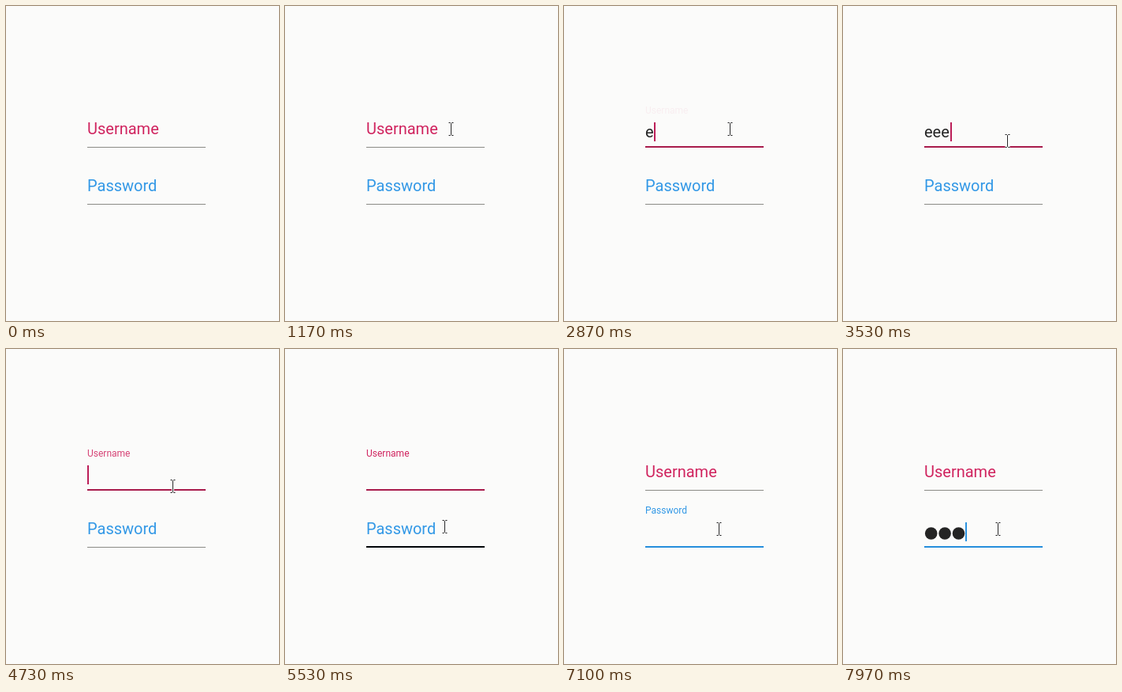
Animation, 346 px wide and 398 px high, one loop 8 s. Source, as an HTML page:

```html
<!DOCTYPE html>
<html lang="en">
<head>
<meta charset="utf-8">
<title>Login fields</title>
<style>
  html, body { margin: 0; width: 100%; height: 100%; overflow: hidden; background: #fbfbfa; }
  svg { display: block; width: 100%; height: 100%; }
  text { font-family: Roboto, Arial, sans-serif; }
</style>
</head>
<body>
<svg id="stage" viewBox="0 0 346 398"></svg>
<script>
const LOOP = 8000, BLINK = 500, LEFT = 103, FIELD_END = 257;
const DARK = '#242424', REST = '#8b8b86';
const stage = document.getElementById('stage');

function set(el, attrs) {
  for (const name in attrs) el.setAttribute(name, attrs[name]);
}
function add(tag, attrs, text = '') {
  const el = document.createElementNS('http://www.w3.org/2000/svg', tag);
  set(el, attrs);
  el.textContent = text;
  stage.append(el);
  return el;
}
const clamp = x => Math.min(1, Math.max(0, x));
const mix = (a, b, k) => a + (b - a) * k;
const smooth = x => { x = clamp(x); return x * x * (3 - 2 * x); };
const shade = (rgb, k) => `rgb(${rgb.map(c => Math.round(c * k))})`;

// bursts of three key presses: start, gap, +1 to type or -1 to delete
const fields = [
  { label: 'Username', y: 178, ink: '#d0245f', line: [168, 28, 76], caret: '#bc1e58',
    focus: 1420, blur: 5520, step: 10.9, glyph: 'e',
    bursts: [[2730, 250, 1], [4130, 175, -1]] },
  { label: 'Password', y: 250, ink: '#3298e6', line: [38, 142, 220], caret: '#2c92e0',
    focus: 5520, blur: Infinity, step: 17.4,
    bursts: [[7470, 170, 1]] }
];

for (const f of fields) {
  f.labelEl = add('text', { x: LEFT, fill: f.ink }, f.label);
  f.lineEl = add('rect', { x: LEFT, width: 150 });
  f.caretEl = add('rect', { y: f.y - 31, width: 2, height: 24, fill: f.caret });
  if (f.glyph) f.textEl = add('text', { x: LEFT, y: f.y - 12, 'font-size': 20, fill: DARK });
  else f.dots = [0, 1, 2].map(i =>
    add('circle', { cx: 111.7 + i * f.step, cy: f.y - 17, r: 7.8, fill: DARK }));
}

const arrow = add('path', { d: 'M0 0V15L3.5 11.8L6 17L8.3 16L6 11H10.5Z', fill: '#111', stroke: '#fff' });
const beamShape = 'M-3 -8H-1L0 -7L1 -8H3M0 -7V7M-3 8H-1L0 7L1 8H3';
const beams = [['#fff', 3], [DARK, 1]].map(([stroke, width]) =>
  add('path', { d: beamShape, fill: 'none', stroke, 'stroke-width': width }));

// pointer moves: start, duration, dx, dy
const moves = [
  [870, 300, -135, -67], [3150, 380, -2, 15], [3570, 160, 3, 3],
  [4800, 640, -9, 51], [5600, 330, -1, 5], [6050, 450, -5, -2]
];

function drawPointer(t) {
  let x = 345.5, y = 222.5;
  for (const [start, time, dx, dy] of moves) {
    const k = smooth((t - start) / time);
    x += dx * k;
    y += dy * k;
  }
  const shown = t >= moves[0][0], overField = x < FIELD_END;
  const transform = `translate(${Math.floor(x) + 0.5} ${Math.floor(y) + 0.5})`;
  for (const beam of beams) set(beam, { transform, opacity: +(shown && overField) });
  set(arrow, { transform, opacity: +(shown && !overField) });
}

function typing(f, t) {
  let count = 0, last = f.focus;
  for (const [start, gap, sign] of f.bursts) {
    if (t < start) break;
    const presses = Math.min(3, Math.floor((t - start) / gap) + 1);
    count += sign * presses;
    last = start + gap * (presses - 1);
  }
  return { count, last };
}

function drawField(f, t) {
  const { count, last } = typing(f, t);
  const up = smooth((t - f.focus) / 300) - smooth((t - f.blur) / 300);

  let opacity = 1;
  if (count) opacity = 1 - clamp((t - f.bursts[0][0]) / 150);
  else if (last > f.focus) opacity = smooth((t - last) / 330);
  set(f.labelEl, { y: f.y - mix(16, 42, up), 'font-size': mix(20, 12, up), opacity });

  const thick = t >= f.focus && t < f.blur + 200;
  set(f.lineEl, {
    y: thick ? f.y - 1 : f.y,
    height: thick ? 2 : 1,
    fill: thick ? shade(f.line, clamp((t - f.focus) / 300)) : REST
  });

  // the caret appears shortly after the focus changes
  const caretOn = t >= f.focus + 50 && t < f.blur && Math.floor((t - last) / BLINK) % 2 === 0;
  set(f.caretEl, { x: Math.round(LEFT + count * f.step), opacity: +caretOn });

  if (f.glyph) f.textEl.textContent = f.glyph.repeat(count);
  else f.dots.forEach((dot, i) => set(dot, { opacity: +(i < count) }));
}

const begin = performance.now();
function frame() {
  const t = (performance.now() - begin) % LOOP;
  for (const f of fields) drawField(f, t);
  drawPointer(t);
  requestAnimationFrame(frame);
}
frame();
</script>
</body>
</html>
```
